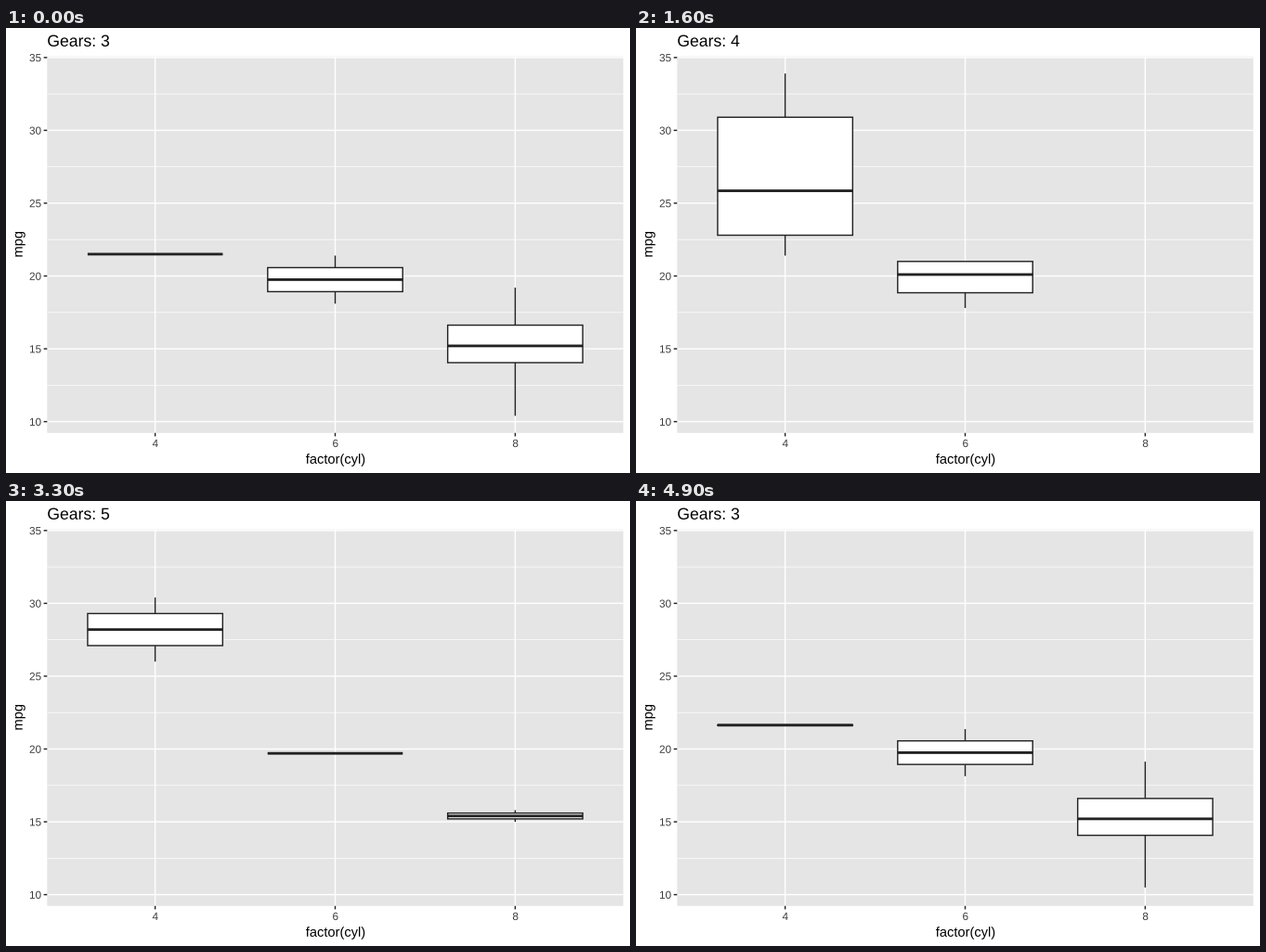
Write a matplotlib script that moves like this. It is 672 by 480 pixels and loops after 5 s.

```python
import numpy as np
import matplotlib.pyplot as plt
from matplotlib.animation import FuncAnimation
from matplotlib.patches import PathPatch, Polygon, Rectangle
from matplotlib.textpath import TextPath
from matplotlib.transforms import Affine2D

W, H, DPI = 672, 480, 96
FRAMES, INTERVAL = 50, 100
PT = 72 / DPI                      # one pixel in points

LEFT, RIGHT, TOP, BOTTOM = 44.3, 664.7, 30.7, 436.8
STEP = (RIGHT - LEFT) / 3.2        # distance between categories
HALF = 0.375 * STEP
THIN, LINE, THICK = 0.71, 1.42, 2.85
PANEL, INK, LABEL = "#e5e5e5", "#222222", "#3d3d3d"

CYLS = (4, 6, 8)
GEARS = (3, 4, 5)
MPG = {
    (4, 3): [21.5],
    (4, 4): [22.8, 24.4, 22.8, 32.4, 30.4, 33.9, 27.3, 21.4],
    (4, 5): [26.0, 30.4],
    (6, 3): [21.4, 18.1],
    (6, 4): [21.0, 21.0, 19.2, 17.8],
    (6, 5): [19.7],
    (8, 3): [18.7, 14.3, 16.4, 17.3, 15.2, 10.4, 10.4, 14.7, 15.5, 15.2,
             13.3, 19.2],
    (8, 5): [15.8, 15.0],
}
STATS = {k: np.percentile(v, [0, 25, 50, 75, 100]) for k, v in MPG.items()}

# Frame at which each move leaves its gear, and the frames it takes
STARTS, MOVE = (5, 22, 39), 11

plt.rcParams["font.family"] = "Liberation Sans"
plt.rcParams["toolbar"] = "None"
fig = plt.figure(figsize=(W / DPI, H / DPI), dpi=DPI, facecolor="white")
ax = fig.add_axes([0, 0, 1, 1])
ax.set(xlim=(0, W), ylim=(H, 0))
ax.axis("off")


def x_of(i):
    return LEFT + (0.6 + i) * STEP


def y_of(mpg):
    return 424.6 - (mpg - 10) * 15.71


def line(x, y, color, width, z):
    return ax.plot(x, y, color=color, lw=width * PT, zorder=z, snap=False,
                   solid_capstyle="butt")[0]


def text(s, x, y, size, color="black", align=0.0, angle=0):
    """Place s with its baseline on (x, y); align is the share left of it."""
    path = TextPath((0, 0), s, size=size)
    width = path.get_extents().x1
    place = (Affine2D().translate(-align * width, 0).rotate_deg(angle)
             .scale(1, -1).translate(x, y))
    patch = PathPatch(place.transform_path(path), fc=color, lw=0, zorder=9,
                      snap=False)
    return ax.add_patch(patch)


def draw_axes():
    ax.add_patch(Rectangle((LEFT, TOP), RIGHT - LEFT, BOTTOM - TOP, fc=PANEL,
                           lw=0, zorder=0, snap=False))
    for v in np.arange(12.5, 35, 5):
        line([LEFT, RIGHT], [y_of(v)] * 2, "white", THIN, 1)
    for v in range(10, 36, 5):
        y = y_of(v)
        line([LEFT, RIGHT], [y, y], "white", LINE, 1)
        line([LEFT - 3.65, LEFT], [y, y], INK, LINE, 1)
        text(str(v), 37.6, y + 4.3, 11.73, LABEL, 1)
    for i, cyl in enumerate(CYLS):
        x = x_of(i)
        line([x, x], [TOP, BOTTOM], "white", LINE, 1)
        line([x, x], [BOTTOM, BOTTOM + 3.65], INK, LINE, 1)
        text(str(cyl), x, 452, 11.73, LABEL, 0.5)
    text("factor(cyl)", (LEFT + RIGHT) / 2, 469.8, 14.67, align=0.5)
    text("mpg", 17.7, (TOP + BOTTOM) / 2, 14.67, align=0.5, angle=90)


class Box:
    def __init__(self, i):
        self.x = x_of(i)
        self.whiskers = [line([], [], INK, LINE, 3) for _ in range(2)]
        self.body = ax.add_patch(Polygon([(0, 0)] * 3, fc="white", ec=INK,
                                         lw=LINE * PT, joinstyle="miter",
                                         zorder=4, snap=False))
        self.median = line([], [], INK, THICK, 5)

    def show(self, stats, alpha):
        parts = [*self.whiskers, self.body, self.median]
        for part in parts:
            part.set_visible(stats is not None)
            part.set_alpha(alpha)
        if stats is None:
            return
        low, q1, mid, q3, high = y_of(stats)
        a, b = self.x - HALF, self.x + HALF
        self.whiskers[0].set_data([self.x] * 2, [q1, low])
        self.whiskers[1].set_data([self.x] * 2, [q3, high])
        self.body.set_xy([(a, q3), (a, q1), (b, q1), (b, q3)])
        self.median.set_data([a, b], [mid, mid])


def phase(frame):
    """Index of the gear being left and the progress towards the next."""
    for i, start in enumerate(STARTS):
        if frame < start + MOVE:
            return i, max(0, frame - start) / MOVE
    return 0, 0.0


def blend(old, new, e):
    """Boxes morph, shrink to their median when leaving, fade in when new."""
    if old is None:
        return (new, e) if e > 0 else (None, 1)
    if new is None:
        new = np.full(5, old[2])
    return old + (new - old) * e, 1


draw_axes()
boxes = [Box(i) for i in range(len(CYLS))]
titles = [text(f"Gears: {g}", LEFT, 19.8, 17.6) for g in GEARS]


def update(frame):
    i, t = phase(frame)
    j = (i + 1) % len(GEARS)
    e = 0.5 - 0.5 * np.cos(np.pi * t)
    for cyl, box in zip(CYLS, boxes):
        box.show(*blend(STATS.get((cyl, GEARS[i])),
                        STATS.get((cyl, GEARS[j])), e))
    shown = j if t > 0.6 else i
    for k, title in enumerate(titles):
        title.set_visible(k == shown)
    return []


anim = FuncAnimation(fig, update, frames=FRAMES, interval=INTERVAL,
                     repeat=True, repeat_delay=0, blit=False)
plt.show()
```
